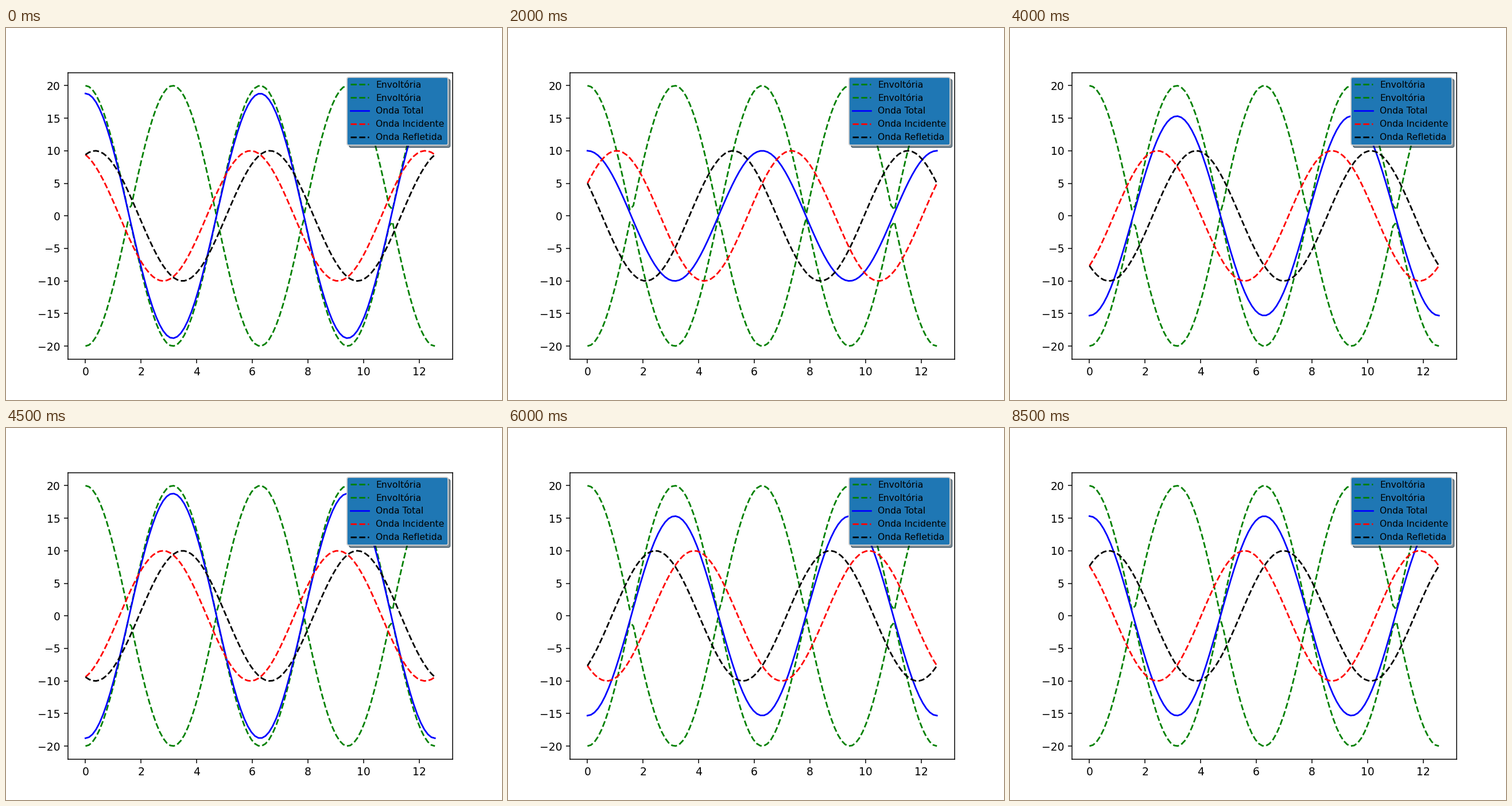
A matplotlib script for the animation above (9000 ms loop, 864 by 648 pixels).

```python
import numpy as np
import matplotlib.pyplot as plt
from matplotlib.animation import FuncAnimation

plt.rcParams["font.family"] = "DejaVu Sans"

FRAMES = 18
INTERVAL = 500
AMP = 10

x = np.linspace(0, 4 * np.pi, 100)
envelope = 2 * AMP * np.abs(np.cos(x))

fig, ax = plt.subplots(figsize=(6.4, 4.8), dpi=135)
ax.plot(x, envelope, "g--", label="Envoltória")
ax.plot(x, -envelope, "g--", label="Envoltória")
total, = ax.plot(x, envelope, "b", label="Onda Total")
incident, = ax.plot(x, envelope, "r--", label="Onda Incidente")
reflected, = ax.plot(x, envelope, "k--", label="Onda Refletida")

margin = 0.05 * x[-1]
ax.set_xlim(-margin, x[-1] + margin)
ax.set_ylim(-22, 22)
ax.legend(loc="upper right", shadow=True, fontsize="small",
          facecolor="C0", framealpha=1)


def update(i):
    phase = 2 * np.pi * (i - 1) / FRAMES
    forward = AMP * np.cos(x - phase)
    backward = AMP * np.cos(x + phase)
    incident.set_ydata(forward)
    reflected.set_ydata(backward)
    total.set_ydata(forward + backward)
    return total, incident, reflected


def init():
    return update(0)


anim = FuncAnimation(fig, update, frames=FRAMES, init_func=init,
                     interval=INTERVAL, repeat=True, repeat_delay=0)
plt.show()
```
